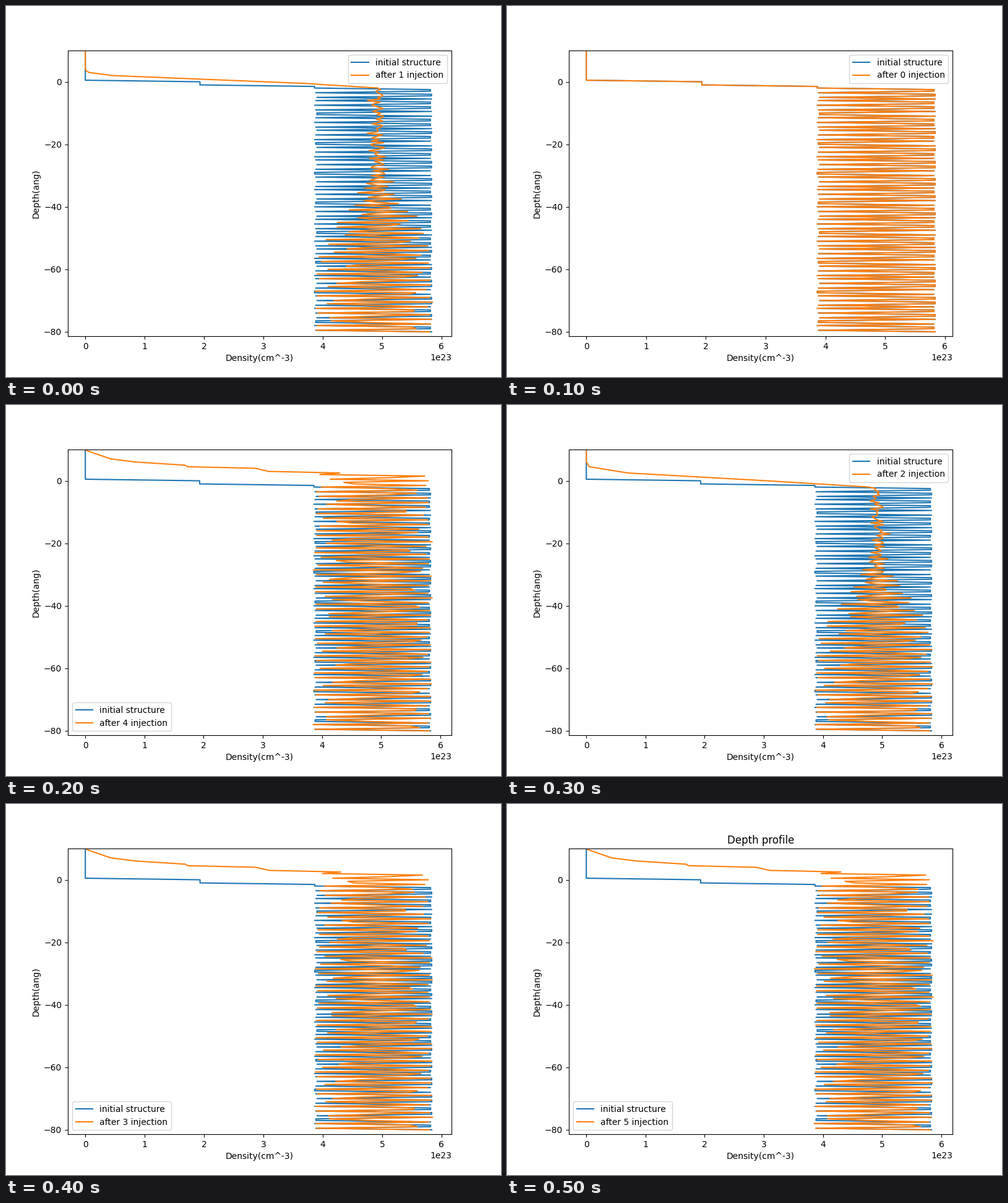
A matplotlib script for the animation above (600 ms loop, 800 by 600 pixels).

```python
import math

import matplotlib.pyplot as plt
import numpy as np
from matplotlib.animation import FuncAnimation

SPACING = 1.3575               # distance between atomic layers
LEAD, WIDTH = 0.3225, 3.4925   # averaging window around each sample
HEIGHT = np.arange(12, -80.25, -0.5)
DEPTH = -HEIGHT
LAYERS = np.arange(-8, 61)
WEIGHTS = np.where(LAYERS % 4 < 2, 1.932, 1.951)
REST = LAYERS * SPACING
erf = np.vectorize(math.erf)


def window_density(centers, weights, sigma):
    """Density seen by a sliding window over blurred layers."""
    def below(edge):
        t = (edge[:, None] - centers) / (sigma * math.sqrt(2))
        return 0.5 * (1 + erf(t))

    lead = DEPTH + LEAD
    return ((below(lead) - below(lead - WIDTH)) * weights).sum(axis=1)


def blur(depth, base, extra, middle):
    """Layer blur: wide near the surface, narrow in the intact crystal."""
    return base + extra / (1 + np.exp((depth - middle) / 7.5))


def damaged_profile(slope, lift, disorder, peak, seed):
    """Swollen, blurred lattice below a few points of surface slope."""
    centers = REST - np.interp(REST, [0, 35, 56, 80], [lift, 0.575, 0.37, 0])
    density = window_density(centers, WEIGHTS, blur(REST, *disorder))

    rng = np.random.default_rng(seed)
    density += rng.normal(0, 0.12, len(DEPTH)) * blur(DEPTH, *disorder)
    density = np.clip(density, 3.85, peak)

    heights, values = zip(*reversed(slope))
    ramp = np.interp(HEIGHT, heights, values)
    return np.where(HEIGHT >= heights[0], ramp, density)


SOFT = [(3.7, 0), (3, 0.06), (2, 0.45), (-0.5, 3.67), (-2, 4.93)]
SOFTER = [(6, 0), (4.5, 0.05), (2.5, 0.7), (0, 3.05), (-2, 4.77)]
STEPPED = [(9.8, 0), (7, 0.43), (6, 0.85), (5, 1.68), (4.5, 1.73),
           (4, 2.87), (3, 3.1), (2.5, 4.3)]

INITIAL = window_density(REST, np.where(LAYERS < 0, 0, WEIGHTS), 1e-3)
FIRST = damaged_profile(SOFT, 1.0, (0.11, 0.49, 36), 5.877, 3)
SECOND = damaged_profile(SOFTER, 1.0, (0.1, 0.5, 32), 5.894, 5)
THIRD = damaged_profile(STEPPED, 1.4, (0.11, 0.05, 20), 5.874, 7)
FOURTH = damaged_profile(STEPPED, 1.4, (0.1, 0.04, 20), 5.894, 9)

# injection count, profile, largest density, legend place, title
SCENES = [
    (1, FIRST, 5.877, "upper right", ""),
    (0, INITIAL, 5.834, "upper right", ""),
    (4, FOURTH, 5.894, "lower left", ""),
    (2, SECOND, 5.894, "upper right", ""),
    (3, THIRD, 5.874, "lower left", ""),
    (5, FOURTH, 5.894, "lower left", "Depth profile"),
]

fig, ax = plt.subplots(figsize=(8, 6), dpi=100)


def draw(index):
    count, profile, peak, place, title = SCENES[index]
    ax.clear()
    ax.plot(INITIAL * 1e23, HEIGHT, label="initial structure")
    ax.plot(profile * 1e23, HEIGHT, label=f"after {count} injection")
    ax.set_xlim(-0.05 * peak * 1e23, 1.05 * peak * 1e23)
    ax.set_ylim(-81.4, 10)
    ax.set_xlabel("Density(cm^-3)")
    ax.set_ylabel("Depth(ang)")
    ax.set_title(title)
    ax.legend(loc=place)


animation = FuncAnimation(fig, draw, frames=len(SCENES), interval=100,
                          init_func=lambda: None, repeat=True, repeat_delay=0)
plt.show()
```
